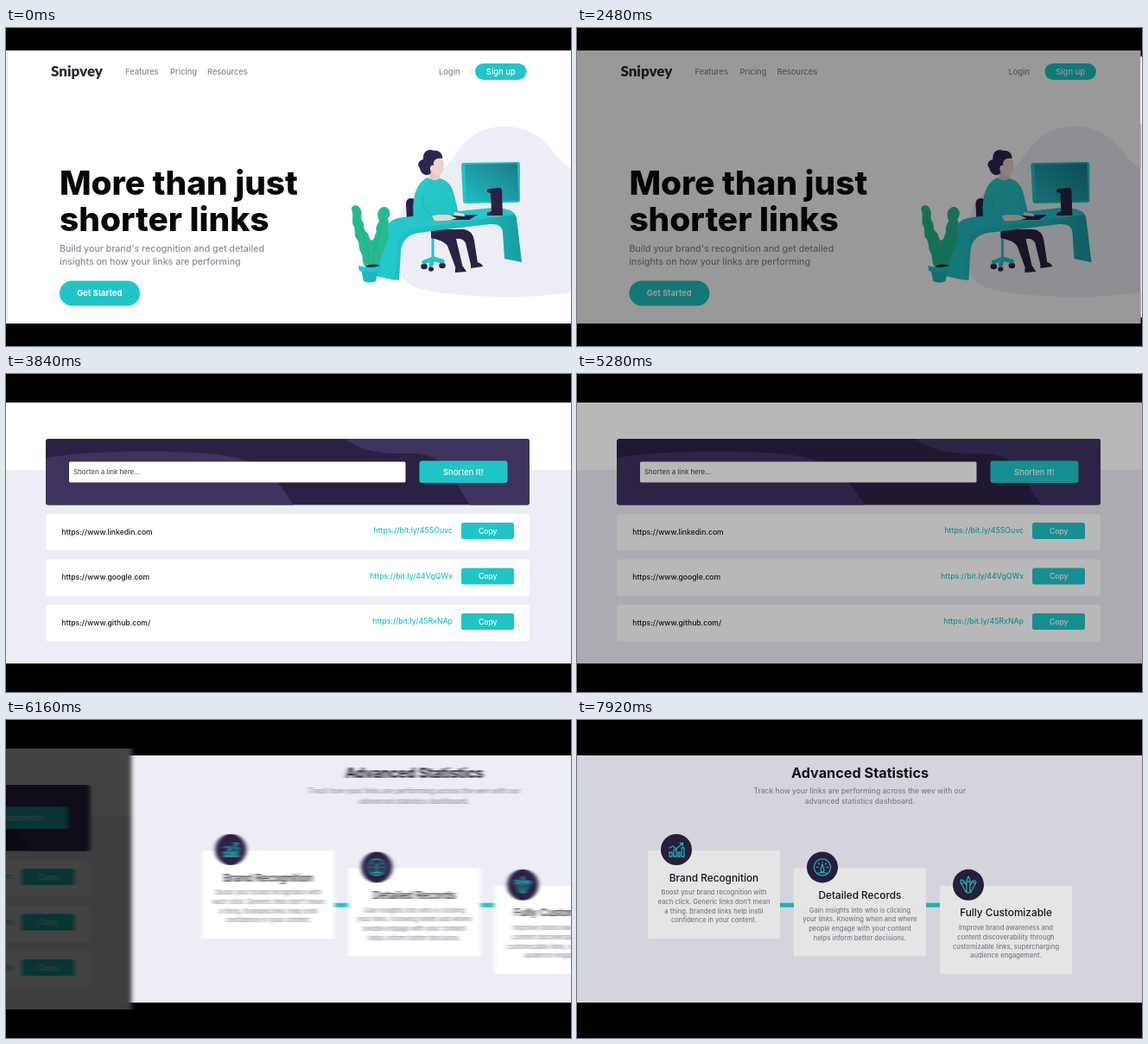
An HTML page for the animation above (8000 ms loop, 654x368 px).

```html
<!DOCTYPE html>
<html lang="en">
<head>
<meta charset="utf-8">
<title>Link shortener slides</title>
<style>
  html, body { margin: 0; width: 100%; height: 100%; overflow: hidden; background: #000; }
  svg { display: block; width: 654px; height: 368px; font-family: Inter, "Open Sans", sans-serif; }
  .logo { font: 900 17px Lato, sans-serif; fill: #2b2a33; }
  .nav { font-size: 9.3px; font-weight: 500; fill: #8b8894; }
  .btn { font-size: 9.35px; font-weight: 500; fill: #fff; }
  .bold { font-weight: 700; }
  .hero { font-size: 38.8px; font-weight: 800; fill: #060606; }
  .lead { font-size: 10.62px; font-weight: 500; fill: #8d8a98; }
  .field { font-size: 7.85px; font-weight: 500; fill: #55535c; }
  .url { font-size: 8.6px; font-weight: 500; fill: #1b1a22; }
  .short { font-size: 8.7px; font-weight: 500; fill: #1fc0c3; }
  .copy { font-size: 8.6px; font-weight: 500; fill: #fff; }
  .title { font-size: 16.25px; font-weight: 700; fill: #17161d; }
  .sub { font-size: 8.53px; font-weight: 500; fill: #8d8a98; }
  .head { font-size: 11.8px; font-weight: 500; fill: #17161d; }
  .note { font-size: 7.55px; font-weight: 500; fill: #8a8794; }
  .mid { text-anchor: middle; }
  .end { text-anchor: end; }
  .icon { fill: none; stroke: #22c3c6; stroke-width: 1.3; stroke-linecap: round; stroke-linejoin: round; }
</style>
</head>
<body>
<svg id="stage" viewBox="0 0 654 368">
  <defs>
    <filter id="smear" filterUnits="userSpaceOnUse" x="-30" y="0" width="714" height="368" color-interpolation-filters="sRGB">
      <feGaussianBlur id="blur" stdDeviation="0 0"/>
    </filter>
    <linearGradient id="screen" x1="1" y1="0" x2="0" y2="1">
      <stop offset="0" stop-color="#1b7a88"/><stop offset="1" stop-color="#20bdbf"/>
    </linearGradient>
    <linearGradient id="desk">
      <stop offset="0" stop-color="#20c3c6"/><stop offset=".7" stop-color="#1fb9bc"/><stop offset="1" stop-color="#179ca2"/>
    </linearGradient>
    <linearGradient id="shirt" x1="0" y1="0" x2="1" y2="1">
      <stop offset="0" stop-color="#2ccaca"/><stop offset="1" stop-color="#20c0c2"/>
    </linearGradient>
  </defs>
  <g id="strip"></g>
</svg>
<script>
const TEAL = '#20c5c8', INK = '#2b2142', MIST = '#ecedf5', GREEN = '#27ba8f', SKIN = '#efd3d1';
const LOOP = 8000, STEP = 80, WIDTH = 654;

const rect = (x, y, w, h, fill, r = 0) =>
  `<rect x="${x}" y="${y}" width="${w}" height="${h}" rx="${r}" fill="${fill}"/>`;
const path = (d, fill) => `<path d="${d}" fill="${fill}"/>`;
const line = (d, color, w) =>
  `<path d="${d}" fill="none" stroke="${color}" stroke-width="${w}" stroke-linecap="round" stroke-linejoin="round"/>`;
const oval = (x, y, rx, ry, fill) => `<ellipse cx="${x}" cy="${y}" rx="${rx}" ry="${ry}" fill="${fill}"/>`;
const text = (cls, x, y, s) => `<text class="${cls}" x="${x}" y="${y}">${s}</text>`;
const lines = (cls, x, y, gap, list) => list.map((s, i) => text(cls, x, y + i * gap, s)).join('');

function cactus() {
  return path('M400 210 C399 205 407 203 410 209 C413 214 410 218 412 223 C416 227 413 231 416 235 C421 238 419 243 423 246'
    + ' C428 244 426 239 429 236 C427 231 430 227 432 223 C428 216 431 207 438 207 C445 208 446 216 442 221'
    + ' C445 227 440 232 442 237 C445 243 440 247 439 252 C439 258 434 260 434 266 L431 277 L416 277'
    + ' C411 270 414 265 411 260 C407 254 410 249 406 244 C402 240 405 235 403 230 C399 225 403 218 400 210 Z', GREEN)
    + line('M406 213 C408 232 418 242 421 272 M437 216 C434 240 426 250 424 272', '#20aa85', .7);
}

function pot() {
  return oval(425, 276, 8, 2.4, INK)
    + path('M411 279 L414 293 Q421 296 428 293 L431 279 Z', '#1fb5ba')
    + path('M408 275 Q421 279 433 275 L432 281 Q421 285 409 281 Z', TEAL);
}

function worker() {
  return path('M464 221 L463 204 Q463 197 469 197 Q475 197 476 205 L478 222 Z', INK)
    // chair stand
    + line('M494 234 V268', TEAL, 3)
    + oval(484, 276, 3.8, 3.2, INK) + oval(505, 275, 3.8, 3.2, INK) + oval(492, 279, 3, 2.8, INK)
    + line('M484 271 L494 267 L505 270 M494 268 L492 274', TEAL, 5)
    // legs
    + path('M492 233 L530 233 Q540 234 542 246 L546 272 L538 274 L532 249 Q529 243 521 244 L529 278 L521 279 L511 252 Q507 246 492 243 Z', INK)
    + path('M520 278 L529 276 L533 282 L520 283 Z', INK)
    + path('M538 273 L546 271 Q551 273 552 276 L538 278 Z', INK);
}

function torso() {
  return path('M490 163 L502 165 L502 178 L490 177 Z', '#e9c6c5')
    + oval(499.5, 159, 7.5, 12, SKIN)
    + path('M479 162 C475 158 478 153 483 152 C482 142 490 139 495 142 C501 141 506 146 505 151 C498 150 494 153 495 159 C491 158 490 163 492 167 C489 173 480 170 479 162 Z', '#2d2650')
    + path('M488 173 C494 177 499 177 502 174 C513 177 517 184 519 194 L524 215 L497 221 L472 223 C470 205 471 181 488 173 Z', 'url(#shirt)')
    + line('M482 193 C481 208 487 215 500 218', '#1cb3b5', 1)
    + path('M493 217 Q507 215 515 217 L522 220 Q512 224 496 223 Z', SKIN)
    + path('M519 213 L530 215 L531 218 L518 217 Z', SKIN);
}

function desk() {
  return path('M428 287 L437 240 Q441 221 458 220 L570 209 Q589 209 591 220 L597 271 L577 267 L575 236 Q574 226 560 227 L478 237 Q459 240 457 258 L455 292 Z', 'url(#desk)')
    + path('M441 229 Q446 220 460 219 L562 208 Q585 208 589 216 L574 218 L472 232 Q455 234 453 250 L451 292 L428 287 L437 240 Z', '#22c8ca');
}

function monitor() {
  return path('M530 156 L592 155 Q595 155 595 158 L595 199 Q595 202 592 202 L532 203 Q529 203 529 200 L527 159 Q527 156 530 156 Z', TEAL)
    + path('M531 158 L592 156.5 L593.5 200 L533 201 Z', 'url(#screen)')
    + path('M557 188 Q557 186 560 186 L571 185 Q574 185 574 188 L575 217 L557 217 L557 214 L562 212 L561 191 L557 190 Z', INK)
    + path('M506 222 L517 217 L546 216 L536 222 Z', INK);
}

function heroSlide() {
  return rect(0, 26, WIDTH, 316, '#fff') + rect(0.5, 27, 1, 315, '#d6d6da')
    + text('logo', 52, 55.5, 'Snipvey')
    + text('nav', 138, 54.2, 'Features') + text('nav', 190, 54.2, 'Pricing') + text('nav', 233, 54.2, 'Resources')
    + text('nav', 501, 54.2, 'Login')
    + rect(543, 41, 59.5, 19, TEAL, 9.5) + text('btn mid', 572.7, 54.2, 'Sign up')
    + lines('hero', 62, 193, 42, ['More than just', 'shorter links'])
    + lines('lead', 62, 258.8, 15, ["Build your brand's recognition and get detailed", 'insights on how your links are performing'])
    + rect(62, 292.5, 93, 29, TEAL, 14.5) + text('btn bold mid', 108.3, 310.2, 'Get Started')
    + path('M654 162 C634 154 626 114 578 114 C548 114 532 128 518 150 C500 176 470 182 458 212 C446 245 446 285 470 298 C500 312 600 315 654 306 Z', MIST)
    + worker() + desk() + monitor() + torso() + cactus() + pot();
}

function linkRow(y, url, short) {
  return rect(46, y, 560, 42.3, '#fff', 3)
    + text('url', 64.3, y + 23.8, 'https://www.' + url)
    + text('short end', 517, y + 22.3, 'https://bit.ly/' + short)
    + rect(527, y + 10, 61, 19, TEAL, 2.5) + text('copy mid', 557.7, y + 22.8, 'Copy');
}

function linksSlide() {
  return rect(0, 33, WIDTH, 302, MIST) + rect(0, 33, WIDTH, 78, '#fff')
    + rect(46, 75, 560, 76.5, INK, 3)
    + path('M46 97 C90 89 170 88 220 91 C300 95 310 118 333 151.5 H49 Q46 151.5 46 148.5 Z', '#3e325f')
    + path('M392 75 C410 88 430 93 465 92 C510 91 512 115 537 151.5 H603 Q606 151.5 606 148.5 V78 Q606 75 603 75 Z', '#3e325f')
    + rect(73, 101.5, 389.5, 24, '#fff', 1.5) + text('field', 78, 116.4, 'Shorten a link here...')
    + rect(478.5, 100.5, 102, 25.5, TEAL, 3) + text('btn mid', 529.3, 116.8, 'Shorten It!')
    + linkRow(162, 'linkedin.com', '45SOuvc')
    + linkRow(214.5, 'google.com', '44VgQWx')
    + linkRow(267, 'github.com/', '45RxNAp');
}

const icons = [
  'M-8 8V3H-5V8Z M-3 8V0H0V8Z M2 8V3H4V8Z M6 8V-2H9V8Z M-8 -2L-4 -4L0 -1L7 -7 M4 -7.5H7.5V-4',
  'M0 -9.5A9.5 9.5 0 1 1 -.1 -9.5Z M-6.5 0H-5 M5 0H6.5 M-4.6 -4.6L-3.6 -3.6 M4.6 -4.6L3.6 -3.6 M0 -6.5V-6 M0 -4L1.8 2.5A2 2 0 1 1 -1.8 2.5Z M-4.5 6.5H4.5',
  'M-2 9V-5L0 -10L2 -5V9Z M-2 -4H2 M-3 8L-9 -3L-8.5 -6L-5.5 -5L-2 1 M3 8L9 -3L7 -5L4.5 -4L2 1 M-8 -1L-5 -3 M8 -1L5 -3'
];

function card(i, head, list) {
  const x = 82 + 169 * i, y = 151 + 20.4 * i, mid = x + 76.5;
  return rect(x, y, 153, 102, '#fff')
    + `<circle cx="${x + 33}" cy="${y - 1}" r="18" fill="${INK}"/>`
    + `<path class="icon" transform="translate(${x + 33} ${y - 1})" d="${icons[i]}"/>`
    + text('head mid', mid, y + 35.6, head)
    + lines('note mid', mid, y + 51.3, 10.7, list);
}

function statsSlide() {
  return rect(0, 41, WIDTH, 286, MIST)
    + text('title mid', 327.5, 67, 'Advanced Statistics')
    + lines('sub mid', 327.3, 84.7, 12, ['Track how your links are performing across the wev with our', 'advanced statistics dashboard.'])
    + rect(200, 211.7, 240, 5, TEAL)
    + card(0, 'Brand Recognition', ['Boost your brand recognition with', 'each click. Generic links don’t mean', 'a thing. Branded links help instil', 'confidence in your content.'])
    + card(1, 'Detailed Records', ['Gain insights into who is clicking', 'your links. Knowing when and where', 'people engage with your content', 'helps inform better decisions.'])
    + card(2, 'Fully Customizable', ['Improve brand awareness and', 'content discoverability through', 'customizable links, supercharging', 'audience engagement.']);
}

// each slide: content, top, height
const strip = document.getElementById('strip');
const blur = document.getElementById('blur');
strip.innerHTML = [[heroSlide(), 26, 316], [linksSlide(), 33, 302], [statsSlide(), 41, 286]]
  .map(([body, y, h]) => `<g>${body}<rect class="shade" x="0" y="${y}" width="${WIDTH}" height="${h}" opacity="0"/></g>`)
  .join('');
const slides = [...strip.children];
const shades = slides.map(s => s.querySelector('.shade'));

const exits = [1520, 4525, 7530];
const shadeSteps = [[200, 0], [390, .1], [755, .28], [960, .4], [1680, .76], [2320, .8]];
const PUSH_AT = 765, PUSH_TIME = 1470;

function track(steps, t) {
  if (t <= steps[0][0]) return steps[0][1];
  for (let i = 1; i < steps.length; i++) {
    const [t0, v0] = steps[i - 1], [t1, v1] = steps[i];
    if (t <= t1) return v0 + (v1 - v0) * (t - t0) / (t1 - t0);
  }
  return steps[steps.length - 1][1];
}

// quartic ease in and out
function push(t) {
  const p = Math.min(1, Math.max(0, (t - PUSH_AT) / PUSH_TIME));
  return p < .5 ? 8 * p ** 4 : 1 - 8 * (1 - p) ** 4;
}

function draw(t) {
  const pos = exits.reduce((sum, at) => sum + push(t - at), 0);
  const speed = exits.reduce((sum, at) => sum + push(t - at + 4) - push(t - at - 4), 0) * WIDTH / 8;
  slides.forEach((slide, i) => {
    const x = (i - pos) * WIDTH;
    slide.setAttribute('transform', `translate(${x.toFixed(2)} 0)`);
    slide.style.display = Math.abs(x) < WIDTH ? '' : 'none';
    shades[i].setAttribute('opacity', track(shadeSteps, t - exits[i]).toFixed(3));
  });
  if (speed > .08) {
    blur.setAttribute('stdDeviation', `${(speed * 2.6).toFixed(2)} 0`);
    strip.setAttribute('filter', 'url(#smear)');
  } else {
    strip.removeAttribute('filter');
  }
}

const start = performance.now();
function tick() {
  const t = (performance.now() - start + 16) % LOOP;
  draw(Math.floor(t / STEP) * STEP);
  requestAnimationFrame(tick);
}
tick();
</script>
</body>
</html>
```
